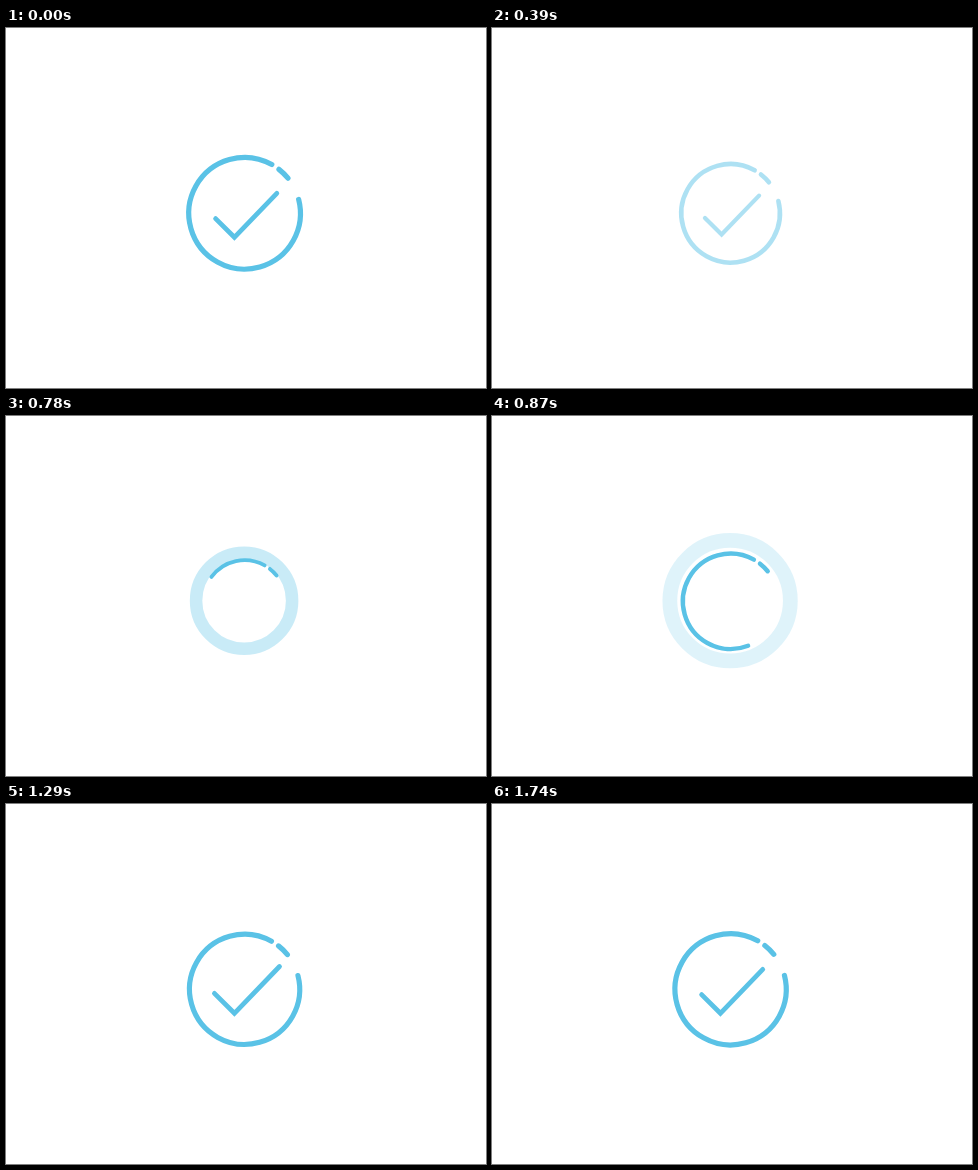
Write an HTML page with a canvas that moves like this. It is 480 by 360 pixels and loops after 1.77 s.

```html
<!DOCTYPE html>
<html lang="en">
<head>
<meta charset="utf-8">
<title>Check mark</title>
<style>
  html, body { margin: 0; width: 100%; height: 100%; overflow: hidden; background: #fff; }
  canvas { display: block; }
</style>
</head>
<body>
<canvas id="stage" width="480" height="360"></canvas>
<script>
const ctx = document.getElementById('stage').getContext('2d');
const LOOP = 1770, STEP = 30;
const CX = 238.6, CY = 185.3, RADIUS = 55.8, LINE = 5.2;
const rad = deg => deg * Math.PI / 180;
const progress = (t, from, to) => Math.min(1, Math.max(0, (t - from) / (to - from)));

const backIn = p => p * p * (2.70158 * p - 1.70158);
const quadOut = p => 1 - (1 - p) ** 2;
const quadInOut = p => p < .5 ? 2 * p * p : 1 - 2 * (1 - p) ** 2;

// Damped spring from 0 to 1, s in seconds
function spring(s, freq, damp) {
  if (s <= 0) return 0;
  const a = freq * s;
  return 1 - Math.exp(-damp * s) * (Math.cos(a) + damp / freq * Math.sin(a));
}

// Damped swing around 1
const wobble = s => s <= 0 ? 1 : 1 + .057 * Math.exp(-4 * s) * Math.sin(15.7 * s);

function arc(from, sweep) {
  ctx.beginPath();
  ctx.arc(0, 0, RADIUS, rad(from), rad(from - Math.max(sweep, .5)), true);
  ctx.stroke();
}

function outline(scale, drawn) {
  ctx.save();
  ctx.scale(scale, scale);
  arc(-60.8, 313.6 * drawn);
  arc(-39, 13);
  ctx.restore();
}

// The tick grows out of its corner
function tick(size) {
  if (size <= 0) return;
  ctx.save();
  ctx.translate(-10.2, 24);
  ctx.lineWidth = Math.min(4.8, 4.8 * Math.sqrt(size));
  ctx.lineJoin = 'miter';
  ctx.beginPath();
  ctx.moveTo(-18.8 * size, -18.7 * size);
  ctx.lineTo(0, 0);
  ctx.lineTo(42.4 * size, -44 * size);
  ctx.stroke();
  ctx.restore();
}

function burst(t) {
  const p = progress(t, 580, 1000);
  if (p <= 0 || p >= 1) return;
  const grow = quadOut(p), width = 3.2 + 12.8 * grow;
  ctx.save();
  ctx.globalAlpha = .62 * (1 - p);
  ctx.lineWidth = width;
  ctx.beginPath();
  ctx.arc(-.5, -.6, 74.8 * grow - width / 2, 0, 2 * Math.PI);
  ctx.stroke();
  ctx.restore();
}

function leave(t) {
  const p = progress(t, 240, 450), scale = 1 - backIn(p);
  if (p >= 1) return;
  ctx.globalAlpha = 1 - p * p;
  ctx.scale(scale, scale);
  outline(1, 1);
  tick(1);
}

function enter(t) {
  burst(t);
  ctx.globalAlpha = progress(t, 590, 710);
  const scale = (.5 + .5 * progress(t, 600, 980)) * wobble((t - 1050) / 1000);
  outline(scale, quadInOut(progress(t, 660, 990)));
  tick(spring((t - 945) / 1000, 9.5, 8.3));
}

function draw(now) {
  const t = Math.floor(now % LOOP / STEP) * STEP;
  ctx.clearRect(0, 0, 480, 360);
  ctx.save();
  ctx.translate(CX, CY);
  ctx.strokeStyle = '#5ac2e6';
  ctx.lineWidth = LINE;
  ctx.lineCap = 'round';
  if (t < 450) leave(t);
  else if (t >= 600) enter(t);
  ctx.restore();
}

let start;
function frame(now) {
  start ??= now;
  draw(now - start);
  requestAnimationFrame(frame);
}
requestAnimationFrame(frame);
</script>
</body>
</html>
```
